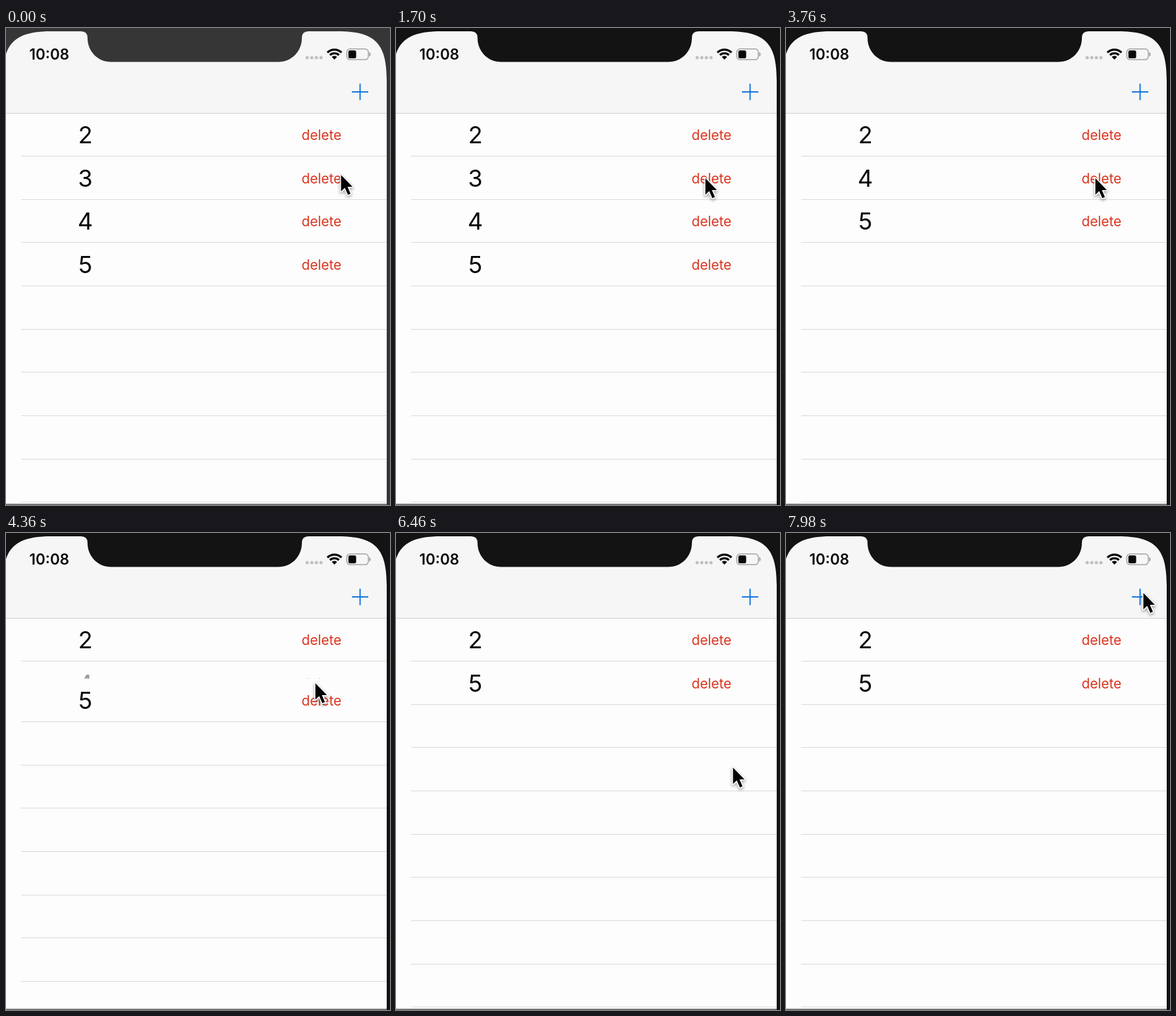
Write an HTML page with a canvas that moves like this. It is 584 by 724 pixels and loops after 8 s.

```html
<!DOCTYPE html>
<html lang="en">
<head>
<meta charset="utf-8">
<title>List with delete buttons</title>
<style>
  html, body { margin: 0; width: 100%; height: 100%; overflow: hidden; background: #fdfdfd; }
  canvas { display: block; }
</style>
</head>
<body>
<canvas id="stage" width="584" height="724"></canvas>
<script>
const ctx = document.getElementById('stage').getContext('2d');
const W = 584, H = 724, LOOP = 8000;
const LIST_TOP = 128.9, ROW = 65.65, LEFT = -5, EDGE = 579;
const FONT = 'Inter, "Liberation Sans", sans-serif';
const PAPER = '#fdfdfd', BAR = '#f6f6f6', INK = '#080808';

// Row value -> start of its removal
const removals = { 3: 2780, 4: 4180 };
const REMOVE_MS = 320;

// Pointer path: time, x, y
const path = [
  [0, 509, 222], [150, 509, 222], [700, 487, 227], [900, 487, 227],
  [1450, 470, 227], [4550, 470, 227], [5000, 486, 227], [5500, 486, 227],
  [6150, 512, 355], [6560, 512, 355], [7250, 543, 90], [LOOP, 543, 90]
];

const clamp = v => Math.max(0, Math.min(1, v));
const ease = v => v * v * (3 - 2 * v);
const mix = (a, b, p) => a + (b - a) * p;

function removed(n, t) {
  return n in removals ? ease(clamp((t - removals[n]) / REMOVE_MS)) : 0;
}

function pointerAt(t) {
  const i = Math.max(1, path.findIndex(k => k[0] > t));
  const [t0, x0, y0] = path[i - 1], [t1, x1, y1] = path[i];
  const p = ease(clamp((t - t0) / (t1 - t0)));
  return [mix(x0, x1, p), mix(y0, y1, p)];
}

function rect(color, x, y, w, h) {
  ctx.fillStyle = color;
  ctx.fillRect(x, y, w, h);
}

function text(str, x, y, font, color, align = 'center') {
  ctx.font = `${font} ${FONT}`;
  ctx.textAlign = align;
  ctx.fillStyle = color;
  ctx.fillText(str, x, y);
}

function pill(x, y, w, h, r) {
  ctx.beginPath();
  ctx.roundRect(x, y, w, h, r);
}

function drawList(t) {
  let shift = 0;
  for (let n = 2; n < 14; n++) {
    const gone = removed(n, t);
    const y = LIST_TOP + (n - 2 - shift) * ROW;
    shift += gone;
    if (gone === 1) continue;
    rect(PAPER, 0, Math.floor(y) + 1, EDGE, H);
    if (n <= 5) {
      ctx.globalAlpha = 1 - gone;
      text(n, 120.7, y + 46.1, '36px', INK);
      text('delete', 479.8, y + 41, '20.8px', '#d9341f');
      ctx.globalAlpha = 1;
    }
    rect('#d9d9db', 23, Math.floor(y + ROW), EDGE - 23, 1);
  }
}

function drawWifi(x, y) {
  ctx.save();
  ctx.beginPath();
  ctx.moveTo(x, y);
  ctx.lineTo(x - 18, y - 18);
  ctx.lineTo(x + 18, y - 18);
  ctx.clip();
  ctx.strokeStyle = INK;
  ctx.lineWidth = 3.2;
  for (const r of [15.2, 9.7]) {
    ctx.beginPath();
    ctx.arc(x, y, r, Math.PI, 2 * Math.PI);
    ctx.stroke();
  }
  ctx.fillStyle = INK;
  ctx.beginPath();
  ctx.arc(x, y, 5.8, Math.PI, 2 * Math.PI);
  ctx.fill();
  ctx.restore();
}

function drawBar() {
  rect(BAR, 0, 0, W, 129);
  rect('#cfcfcf', 0, 129, EDGE, 1);
  text('10:08', 35.5, 48, '600 22.5px', INK, 'left');

  ctx.fillStyle = '#c0c0c0';
  for (let i = 0; i < 4; i++) {
    pill(455.5 + i * 7, 42.5, 5, 5, 2.5);
    ctx.fill();
  }
  drawWifi(499.5, 48);

  ctx.strokeStyle = '#a4a4a4';
  ctx.lineWidth = 1.5;
  pill(518.3, 31.7, 32.8, 16.4, 5);
  ctx.stroke();
  ctx.fillStyle = '#a4a4a4';
  pill(552.3, 37, 2.2, 6, [0, 2, 2, 0]);
  ctx.fill();
  ctx.fillStyle = INK;
  pill(520.7, 34, 11.8, 12, 2.5);
  ctx.fill();

  rect('#1877dc', 526, 96, 25, 2);
  rect('#1877dc', 537.5, 84.5, 2, 25);
}

function drawBezel(color) {
  const reach = 74, pull = 18, top = 5;
  ctx.fillStyle = color;
  ctx.beginPath();
  ctx.rect(-10, -10, W + 20, H + 20);
  ctx.moveTo(LEFT, H + 5);
  ctx.lineTo(LEFT, top + reach);
  ctx.bezierCurveTo(LEFT, top + pull, LEFT + pull, top, LEFT + reach, top);
  ctx.lineTo(EDGE - reach, top);
  ctx.bezierCurveTo(EDGE - pull, top, EDGE, top + pull, EDGE, top + reach);
  ctx.lineTo(EDGE, H + 5);
  ctx.closePath();
  ctx.fill('evenodd');

  ctx.beginPath();
  ctx.moveTo(114, 4);
  ctx.lineTo(114, top);
  ctx.quadraticCurveTo(124, top, 124, 15);
  ctx.bezierCurveTo(124, 35.5, 139.5, 51.5, 160, 51.5);
  ctx.lineTo(414, 51.5);
  ctx.bezierCurveTo(434.5, 51.5, 450, 35.5, 450, 15);
  ctx.quadraticCurveTo(450, top, 460, top);
  ctx.lineTo(460, 4);
  ctx.fill();
  rect('#777777', 0, 722, EDGE, 2);
}

function drawPointer(x, y) {
  ctx.save();
  ctx.translate(x, y);
  ctx.beginPath();
  ctx.moveTo(0.5, 1);
  ctx.lineTo(0.5, 26);
  ctx.lineTo(6.3, 20.6);
  ctx.lineTo(11, 31.2);
  ctx.lineTo(15, 29.5);
  ctx.lineTo(10.4, 19);
  ctx.lineTo(18, 19);
  ctx.closePath();
  ctx.lineJoin = 'round';
  ctx.strokeStyle = '#ffffff';
  ctx.lineWidth = 3.2;
  ctx.shadowColor = 'rgba(0, 0, 0, 0.4)';
  ctx.shadowBlur = 4;
  ctx.shadowOffsetY = 2;
  ctx.stroke();
  ctx.shadowColor = 'transparent';
  ctx.fillStyle = '#030303';
  ctx.fill();
  ctx.restore();
}

const start = performance.now();

function draw() {
  const t = (performance.now() - start) % LOOP;
  rect(PAPER, 0, 0, W, H);
  drawList(t);
  drawBar();
  drawBezel(t < 1660 ? '#363636' : '#131313');
  drawPointer(...pointerAt(t));
  requestAnimationFrame(draw);
}
draw();
</script>
</body>
</html>
```
